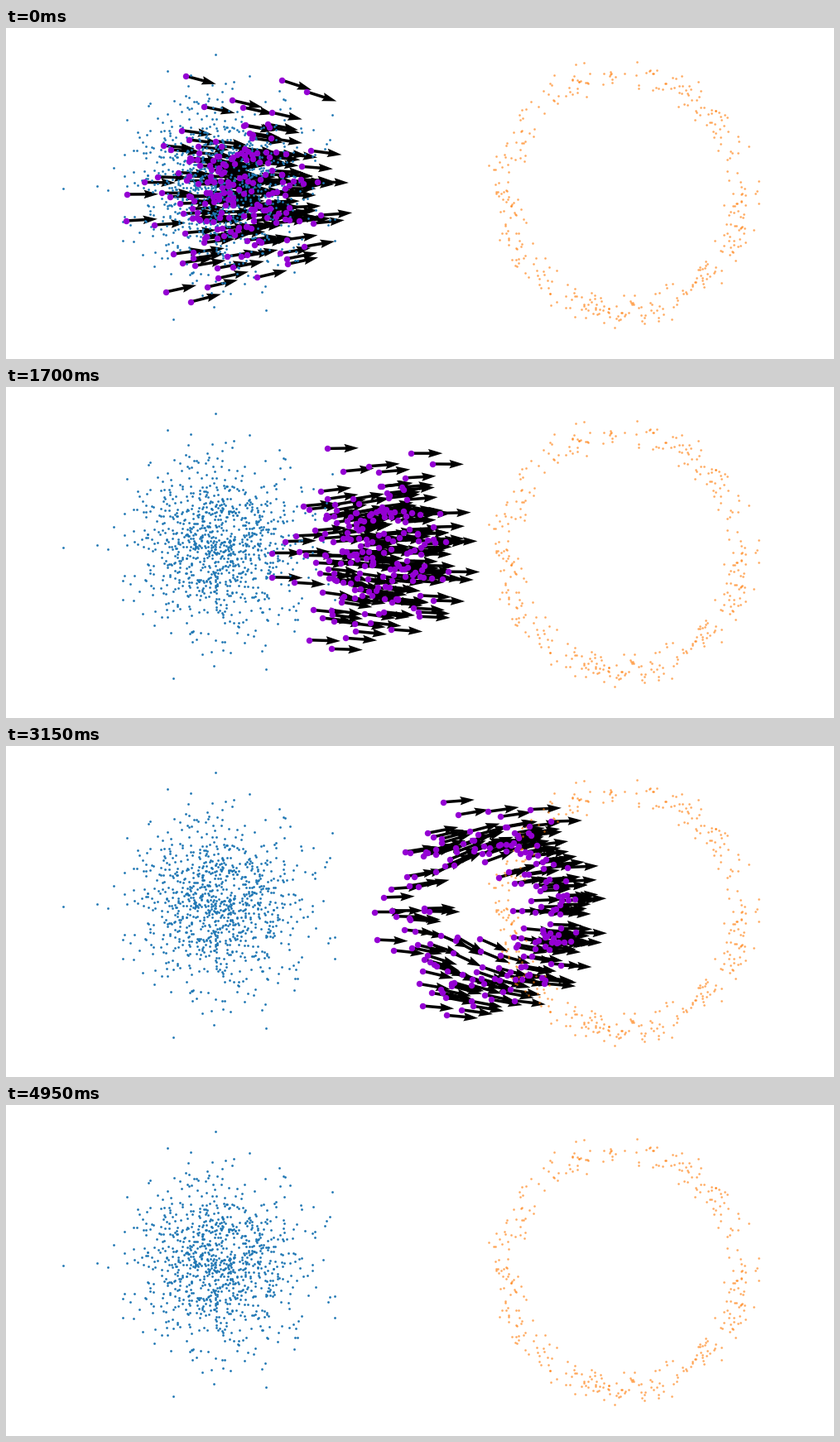
These frames come from a looping animation (1000x400 px, 5000 ms). A matplotlib script:

```python
import numpy as np
import matplotlib.pyplot as plt
from matplotlib.animation import FuncAnimation

W, H, DPI = 1000, 400, 100
FRAMES, INTERVAL = 100, 50
START = np.array([256.0, 199.0])      # centre of the Gaussian cloud
END = np.array([745.0, 198.0])        # centre of the ring
SHIFT = END - START
SPREAD, RADIUS, NOISE = 48.5, 144.0, 9.5
ARROW = 38.0

rng = np.random.default_rng(7)

# A few far points that set the outline of each swarm.
CLOUD_RIM = [(69, 194), (110, 191), (253, 32), (195, 52),
             (394, 105), (397, 257), (202, 352), (314, 341)]
MOVER_RIM = [(217, 58), (333, 63), (363, 77), (146, 201),
             (145, 233), (193, 319), (223, 331), (371, 236)]


def polar(radius, angles):
    return np.column_stack([radius * np.cos(angles), radius * np.sin(angles)])


def gaussian_disc(center, spread, limit, count):
    """Normal samples, keeping only those within the limit."""
    offsets = rng.normal(scale=spread, size=(count * 2, 2))
    inside = np.hypot(*offsets.T) < limit
    return center + offsets[inside][:count]


def make_ring(count):
    angles = rng.uniform(0, 2 * np.pi, count)
    noise = np.clip(rng.normal(scale=NOISE, size=count), -2.2 * NOISE, 2.2 * NOISE)
    return END + polar(RADIUS + noise, angles)


def velocity(points, t):
    """Mean straight-line velocity from the Gaussian to the noisy ring."""
    rim = polar(RADIUS, np.linspace(0, 2 * np.pi, 120, endpoint=False))
    gap = (points - START - t * SHIFT)[:, None] - t * rim
    var = ((1 - t) * SPREAD) ** 2 + (t * NOISE) ** 2
    logits = -(gap ** 2).sum(axis=2) / (2 * var)
    weights = np.exp(logits - logits.max(axis=1, keepdims=True))
    weights /= weights.sum(axis=1, keepdims=True)
    pull = (t * NOISE ** 2 - (1 - t) * SPREAD ** 2) / var
    return SHIFT + (weights[..., None] * (rim + pull * gap)).sum(axis=1)


def make_path(points):
    path = []
    for i in range(FRAMES):
        v = velocity(points, i / FRAMES)
        path.append((points, ARROW * v / np.linalg.norm(v, axis=1, keepdims=True)))
        points = points + v / FRAMES
    return path


cloud = np.vstack([CLOUD_RIM, gaussian_disc((256, 196), 50, 150, 990)])
ring = make_ring(400)
path = make_path(np.vstack([MOVER_RIM, gaussian_disc((269, 198), 50, 118, 190)]))

fig = plt.figure(figsize=(W / DPI, H / DPI), dpi=DPI, facecolor="white")
ax = fig.add_axes([0, 0, 1, 1])
ax.set(xlim=(0, W), ylim=(H, 0))
ax.axis("off")

start, heading = path[0]
arrows = ax.quiver(*start.T, *heading.T, color="black", angles="xy", units="xy",
                   scale_units="xy", scale=1, width=3.5, zorder=1)
ax.scatter(*cloud.T, s=4, lw=0, color="#1f77b4", zorder=2)
ax.scatter(*ring.T, s=3.6, lw=0, color="#ff7f0e", alpha=0.65, zorder=3)
movers = ax.scatter(*start.T, s=29, lw=0, color="darkviolet", zorder=4)


def update(i):
    points, heading = path[i]
    arrows.set_offsets(points)
    arrows.set_UVC(*heading.T)
    movers.set_offsets(points)
    for artist in (arrows, movers):
        artist.set_visible(i < FRAMES - 1)
    return arrows, movers


anim = FuncAnimation(fig, update, frames=FRAMES, interval=INTERVAL,
                     repeat=True, repeat_delay=0)
plt.show()
```
